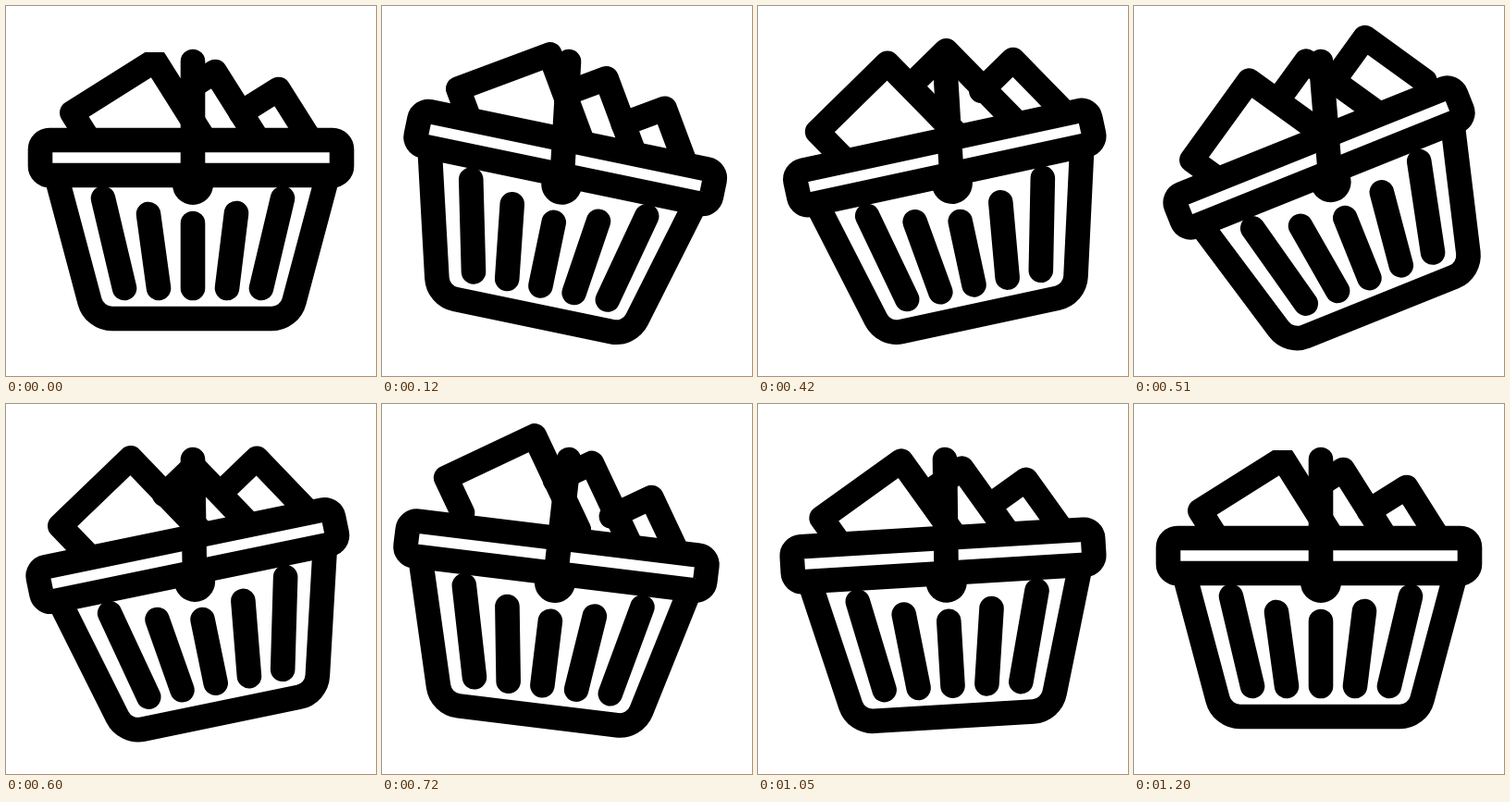
These frames come from a looping animation (400x400 px, 3.26 s). An HTML page with a canvas:

```html
<!DOCTYPE html>
<html lang="en">
<head>
<meta charset="utf-8">
<title>Swinging basket</title>
<style>
  html, body { margin: 0; width: 100%; height: 100%; overflow: hidden; background: #fff; }
  canvas { display: block; width: 100vw; height: 100vh; }
</style>
</head>
<body>
<canvas id="stage" width="400" height="400"></canvas>
<script>
const ctx = document.getElementById('stage').getContext('2d');
const LOOP = 3260, STEP = 30, END = 1200;
const CX = 200, CY = 164;

// [time, value] keys, eased in and out
const TILT = [[0, 0], [240, 23.5], [500, -22], [750, 8], [960, -5], [1200, 0]];
const SHIFT = [[0, 0], [150, -2], [270, -1], [350, 3], [510, 0], [750, -12], [970, 0]];

// corner, length of the top edge and of the right edge, hops [start, end, height]
const ITEMS = [
  { x: 161, y: 59, top: 106, side: 112, tail: 42, hops: [[90, 515, 19], [490, 920, 21]] },
  { x: 226, y: 71, top: 44, side: 103, tail: 0, hops: [[215, 600, 20], [600, 1020, 18]] },
  { x: 294.5, y: 90, top: 48, side: 80, tail: 0, hops: [[330, 690, 28], [690, 1100, 19]] }
];
const EDGE = { x: 0.846, y: -0.533 };

const SLATS = [
  [105, 208, 128, 305], [154, 225, 165, 305], [202, 235, 202, 305],
  [249, 224, 239, 305], [299, 208, 276, 305]
];

function keyed(keys, t) {
  for (let i = 1; i < keys.length; i++) {
    const [t0, a] = keys[i - 1], [t1, b] = keys[i];
    if (t < t1) return a + (b - a) * (1 - Math.cos(Math.PI * (t - t0) / (t1 - t0))) / 2;
  }
  return keys[keys.length - 1][1];
}

function lift(hops, t) {
  return hops.reduce((sum, [a, b, h]) =>
    t > a && t < b ? sum + h * Math.sin(Math.PI * (t - a) / (b - a)) ** 2 : sum, 0);
}

function line(...p) {
  ctx.beginPath();
  ctx.moveTo(p[0], p[1]);
  for (let i = 2; i < p.length; i += 2) ctx.lineTo(p[i], p[i + 1]);
  ctx.stroke();
}

function drawItem({ x, y, top, side, tail, hops }, t) {
  const py = y - lift(hops, t);
  const ex = x - EDGE.x * top, ey = py - EDGE.y * top;
  line(ex - EDGE.y * tail, ey + EDGE.x * tail, ex, ey, x, py,
    x - EDGE.y * side, py + EDGE.x * side);
}

function drawBasket() {
  ctx.beginPath();
  ctx.moveTo(56, 190);
  ctx.arcTo(95.5, 338, 200, 338, 25);
  ctx.arcTo(306.5, 338, 346, 190, 25);
  ctx.lineTo(346, 190);
  ctx.stroke();
  SLATS.forEach(s => line(...s));

  ctx.beginPath();
  ctx.roundRect(37, 145, 326, 38, 10);
  ctx.fillStyle = '#fff';
  ctx.fill();
  ctx.stroke();

  ctx.beginPath();
  ctx.arc(202, 193, 22, 0, Math.PI * 2);
  ctx.fillStyle = '#000';
  ctx.fill();
}

function draw(t) {
  const angle = keyed(TILT, t) * Math.PI / 180;
  const dx = keyed(SHIFT, t);
  const sin = Math.sin(angle), cos = Math.cos(angle);

  ctx.fillStyle = '#fff';
  ctx.fillRect(0, 0, 400, 400);
  ctx.strokeStyle = '#000';
  ctx.lineWidth = 26.6;
  ctx.lineCap = ctx.lineJoin = 'round';

  ctx.save();
  ctx.translate(CX + dx, CY);
  ctx.rotate(angle);
  ctx.translate(-CX, -CY);
  ctx.save();
  if (t <= 0 || t >= END) {
    // the tallest item is trimmed flat while at rest
    ctx.beginPath();
    ctx.rect(0, 50, 400, 350);
    ctx.clip();
  }
  ITEMS.forEach(item => drawItem(item, t));
  ctx.restore();
  drawBasket();
  ctx.restore();

  // handle: fixed at the top, its foot follows the basket
  line(202, 60, CX + dx + 2 * cos - 29 * sin, CY + 2 * sin + 29 * cos);
}

function tick() {
  const t = performance.now() % LOOP;
  draw(Math.min(END, Math.floor(t / STEP) * STEP));
  requestAnimationFrame(tick);
}
tick();
</script>
</body>
</html>
```
